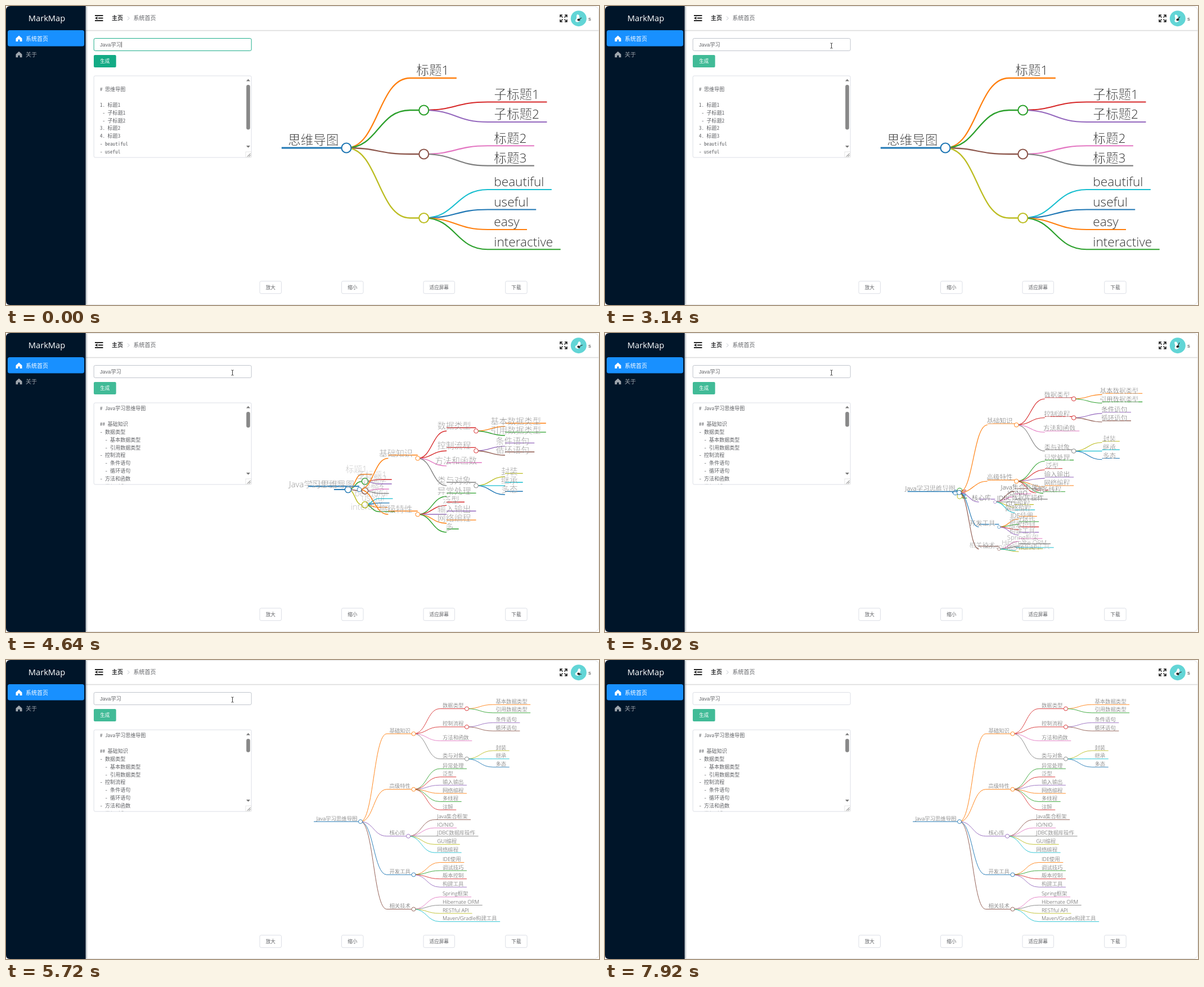
Recreate the animation shown at these times as an HTML page. Size 1054x531 px, loop 8000 ms.

```html
<!DOCTYPE html>
<html lang="zh">
<head>
<meta charset="utf-8">
<title>MarkMap</title>
<style>
html, body { margin: 0; width: 100%; height: 100%; overflow: hidden; background: #fff; }
svg { display: block; width: 1054px; height: 531px; }
text { font-family: 'Liberation Sans', 'Noto Sans CJK SC', 'Noto Sans CJK', sans-serif; white-space: pre; }
.brand { font-family: 'Open Sans', 'Noto Sans', sans-serif; }
.mono { font-family: 'Noto Sans Mono CJK SC', 'Noto Sans CJK SC', 'Noto Sans Mono', monospace; }
.map text { font-family: 'Open Sans', 'Noto Sans CJK SC', 'Noto Sans CJK', sans-serif; font-weight: 300; fill: #333; }
/* a white outline thins the regular weight to a light one */
.map .han { stroke: #fff; stroke-width: 0.03em; }
</style>
</head>
<body>
<svg id="stage" viewBox="0 0 1054 531"></svg>
<script>
const LOOP = 8000;
const stage = document.getElementById('stage');

function set(node, attrs) {
  for (const k in attrs) node.setAttribute(k, attrs[k]);
  return node;
}
function add(tag, attrs, parent = stage, label) {
  const node = set(document.createElementNS('http://www.w3.org/2000/svg', tag), attrs);
  if (label !== undefined) node.textContent = label;
  parent.appendChild(node);
  return node;
}
function label(x, y, size, str, fill, more = {}, parent = stage) {
  return add('text', { x, y: y + size * 0.36, 'font-size': size, fill, ...more }, parent, str);
}
function box(x, y, width, height, rx, fill, stroke = 'none', parent = stage) {
  return add('rect', { x, y, width, height, rx, fill, stroke }, parent);
}
const clamp = v => Math.max(0, Math.min(1, v));
const mix = (a, b, k) => a + (b - a) * k;
// piecewise linear value
function at(t, ts, vs) {
  if (t <= ts[0]) return vs[0];
  for (let i = 1; i < ts.length; i++)
    if (t < ts[i]) return mix(vs[i - 1], vs[i], (t - ts[i - 1]) / (ts[i] - ts[i - 1]));
  return vs[vs.length - 1];
}
function tint(a, b, k) {
  return `rgb(${a.map((v, i) => Math.round(mix(v, b[i], k)))})`;
}

// ---- page frame ----
const MID = { 'text-anchor': 'middle' };
const defs = add('defs', {});
const shade = add('linearGradient', { id: 'shade', x2: 1 }, defs);
add('stop', { offset: 0, 'stop-color': '#001529', 'stop-opacity': 0.3 }, shade);
add('stop', { offset: 1, 'stop-color': '#001529', 'stop-opacity': 0 }, shade);
const clip = add('clipPath', { id: 'clip' }, defs);
box(157, 125, 278, 143.5, 2, '#000', 'none', clip);

box(0.5, 0.5, 1053, 530, 8, 'none', '#e4e4e4');
box(142, 42.8, 911.5, 1.6, 0, '#dcdcdc');
box(141.6, 1, 4, 529, 0, 'url(#shade)');
add('path', { d: 'M141.6 0V531H7Q0 531 0 524V8Q0 0 8 0Z', fill: '#001529' });
label(72.5, 22, 14.7, 'MarkMap', '#fff', { ...MID, class: 'brand' });
box(3, 43, 136, 28.5, 3.5, '#1890ff');
function menu(y, str, fill) {
  add('path', { d: `M23 ${y - 5.5}L28.5 ${y - 0.6}V${y + 5}H24.6V${y + 1.5}H21.4V${y + 5}H17.5V${y - 0.6}Z`, fill });
  label(35, y + 0.3, 10, str, fill);
}
menu(58, '系统首页', '#fff');
menu(86.3, '关于', '#a0a7ae');

add('path', { d: 'M158 17H172.5M164 21.5H172.5M158 26H172.5', stroke: '#222', 'stroke-width': 1.8 });
add('path', { d: 'M158 21.5L162.5 18.8V24.2Z', fill: '#222' });
label(188, 21.8, 10, '主页', '#303133', { 'font-weight': 700 });
add('path', { d: 'M216 18.5L219.3 21.8L216 25.1', fill: 'none', stroke: '#c0c4cc' });
label(226.5, 21.8, 10, '系统首页', '#606266');
for (const [sx, sy] of [[1, 1], [1, -1], [-1, 1], [-1, -1]])
  add('path', { d: 'M6 2V6H2M6 6L1.5 1.5', transform: `translate(991 22) scale(${sx} ${sy})`,
    fill: 'none', stroke: '#222', 'stroke-width': 1.6 });
add('circle', { cx: 1017.8, cy: 22.2, r: 14, fill: '#62d5d6' });
const figure = add('g', {});
add('path', { d: 'M-2 -7Q3 -7 2 -1Q5 3 1 6Q-5 8 -5 3Q-2 0 -3 -4Z', fill: '#fff' }, figure);
add('ellipse', { cx: 1, cy: 2.5, rx: 2.6, ry: 2, fill: '#222' }, figure);
const wing = add('path', { d: 'M1 2L6 -1', stroke: '#333', 'stroke-width': 1.2 }, figure);
label(1035, 22.5, 9.5, 's', '#444');

// ---- form ----
const input = box(156.2, 57.5, 280, 22, 2.5, '#fff', '#dcdfe6');
label(167, 68.6, 9.2, 'Java学习', '#606266');
const caret = box(205, 63.5, 0.8, 10, 0, '#333');
const button = box(156, 87, 39.7, 22, 2, '#13ab85');
label(175.8, 98, 8.6, '生成', '#fff', MID);

box(156.2, 124, 280, 145, 2.5, '#fff', '#dcdfe6');
const editor = add('g', { 'clip-path': 'url(#clip)' });
const rows = Array.from({ length: 11 }, (_, i) =>
  label(167, 134.2 + i * 13.84, 9.05, '', '#606266', { class: 'mono' }, editor));
const bar = add('g', {});
add('path', { d: 'M427 133.5L430.5 129.8L434 133.5ZM427 248L430.5 251.7L434 248Z', fill: '#777' }, bar);
const thumb = box(427.2, 140, 6.6, 79.5, 3.2, '#888', 'none', bar);
box(426, 259, 9.8, 9.6, 0, '#fff', '#e6e6e6');
add('path', { d: 'M429 267.5L434.5 262M432 267.5L434.5 265', stroke: '#444', 'stroke-width': 0.9 });

for (const [x, w, str] of [[451, 38.5, '放大'], [596.5, 38.5, '缩小'], [742, 55.5, '适应屏幕'], [887.7, 38.5, '下载']]) {
  box(x, 488.7, w, 22, 2.5, '#fff', '#dcdfe6');
  label(x + w / 2, 500, 8.6, str, '#606266', MID);
}

const BEFORE = ['', '# 思维导图', '', '1. 标题1', ' - 子标题1', ' - 子标题2', '3. 标题2', '4. 标题3',
  '- beautiful', '- useful', '- easy'];
const AFTER = ['# Java学习思维导图', '', '## 基础知识', '- 数据类型', '  - 基本数据类型', '  - 引用数据类型',
  '- 控制流程', '  - 条件语句', '  - 循环语句', '- 方法和函数', '- 类与对象'];

function drawEditor(t) {
  const fresh = t >= 3850;
  let left = fresh ? Math.floor((t - 3850) * 0.4) : 999;
  (fresh ? AFTER : BEFORE).forEach((line, i) => {
    const shown = line.slice(0, Math.max(0, left));
    if (rows[i].textContent !== shown) rows[i].textContent = shown;
    left -= line.length + 1;
  });
  const lines = fresh ? Math.floor(at(t, [3850, 4220, 4640, 5200, 5450], [0, 21, 39, 43, 46])) : 12.6;
  const height = fresh ? 108 * 145 / (lines * 13.84 + 22) : 79.5;
  set(thumb, { height: Math.min(108, height) });
  bar.style.display = height < 108 ? '' : 'none';
}

// ---- mind maps ----
const COLORS = ['#1f77b4', '#ff7f0e', '#2ca02c', '#d62728', '#9467bd',
  '#8c564b', '#e377c2', '#7f7f7f', '#bcbd22', '#17becf'];
const pen = document.createElement('canvas').getContext('2d');
pen.font = "300 16px 'Open Sans', 'Noto Sans CJK SC', 'Noto Sans CJK', sans-serif";
const measure = str => pen.measureText(str).width + 17.5;

function write(n, str) {
  n.w = measure(str);
  n.text.textContent = '';
  for (const run of str.match(/[\u4e00-\u9fff]+|[^\u4e00-\u9fff]+/g) || [])
    add('tspan', { class: run > '\u4e00' ? 'han' : 'latin' }, n.text, run);
}

// rows: depth, label, colour, line y
function makeMap(table) {
  const root = add('g', { class: 'map' });
  const links = add('g', { fill: 'none' }, root), tops = add('g', {}, root);
  const last = [];
  const nodes = table.map(([depth, str, color, y]) => {
    const n = { depth, str, y, parent: last[depth - 1] };
    last[depth] = n;
    n.path = add('path', { stroke: COLORS[color] }, links);
    n.dot = add('circle', { stroke: COLORS[color], fill: '#fff' }, tops);
    n.text = add('text', {}, tops);
    write(n, str);
    n.dot.style.display = 'none';
    if (n.parent) n.parent.dot.style.display = '';
    return n;
  });
  return { root, nodes };
}
// p: share of the full line width, dot: share of the full circle
function place(n, left, y, s, p, lift, alpha, dot) {
  const w = n.w * s, right = left + w, start = right - w * p;
  n.right = right;
  n.now = y;
  let d = `M${start} ${y - lift}H${right}`;
  if (n.parent) {
    const x = n.parent.right, mid = (x + start) / 2;
    d += `M${x} ${n.parent.now}C${mid} ${n.parent.now} ${mid} ${y} ${start} ${y}`;
  }
  set(n.path, { d, 'stroke-width': s * [2.1, 1.6, 1.5, 1.5][n.depth] });
  set(n.dot, { cx: right, cy: y, r: 6 * s * dot, 'stroke-width': 1.5 * s * dot });
  set(n.text, { x: left + 8 * s, y: y - 4 * s, 'font-size': 16 * s, opacity: alpha });
}

const first = makeMap([
  [0, '思维导图', 0, 252], [1, '标题1', 1, 128],
  [1, '', 2, 185], [2, '子标题1', 3, 170.5], [2, '子标题2', 4, 206],
  [1, '', 5, 263], [2, '标题2', 6, 248.3], [2, '标题3', 7, 283.6],
  [1, '', 8, 376.5], [2, 'beautiful', 9, 326], [2, 'useful', 0, 361.5], [2, 'easy', 1, 397], [2, 'interactive', 2, 432.3]
]);
const second = makeMap([
  [0, 'Java学习思维导图', 0, 287],
  [1, '基础知识', 1, 131],
  [2, '数据类型', 3, 86.5], [3, '基本数据类型', 1, 79.2], [3, '引用数据类型', 2, 93.8],
  [2, '控制流程', 3, 118.8], [3, '条件语句', 4, 111.4], [3, '循环语句', 5, 126],
  [2, '方法和函数', 6, 143.5],
  [2, '类与对象', 7, 175.6], [3, '封装', 8, 161], [3, '继承', 9, 175.6], [3, '多态', 0, 190.2],
  [1, '高级特性', 1, 229.7],
  [2, '异常处理', 2, 193.1], [2, '泛型', 3, 207.7], [2, '输入输出', 4, 222.3],
  [2, '网络编程', 1, 236.9], [2, '多线程', 2, 251.5], [2, '注解', 3, 266.1],
  [1, '核心库', 4, 312.8],
  [2, 'Java集合框架', 5, 283.6], [2, 'IO/NIO', 6, 298.2], [2, 'JDBC数据库操作', 7, 312.8],
  [2, 'GUI编程', 8, 327.4], [2, '网络编程', 9, 342],
  [1, '开发工具', 0, 381.3],
  [2, 'IDE使用', 1, 359.5], [2, '调试技巧', 2, 374.1], [2, '版本控制', 3, 388.7], [2, '构建工具', 4, 403.3],
  [1, '相关技术', 5, 442.5],
  [2, 'Spring框架', 6, 420.8], [2, 'Hibernate ORM', 7, 435.4], [2, 'RESTful API', 8, 450], [2, 'Maven/Gradle构建工具', 9, 464.6]
]);

// growth stages of the second map
const STAGES = [4220, 4640, 5200, 5500];
second.nodes.forEach((n, i) => {
  const { depth, y, parent } = n;
  n.late = depth > 0 && y > 255;
  const early = depth ? 166 + (y - 79) * 1.09 - (depth === 1 && y > 200 ? 8 : 0) : 278;
  n.mid = n.late ? parent.mid : early;
  n.ys = [252, n.mid, at(y, [79, 236.5, 251.5, 266, 283.5, 403, 435.5, 450, 465], [82.5, 242.5, 252, 266, 282.5, 396.5, 427, 440, 437]), y];
  n.ps = [0.02, n.late ? 0 : 0.687, !depth ? 1 : y < 240 ? 0.97 : y < 460 ? 0.9 : 0.76, 1];
  n.born = n.late ? 4640 + (i - 18) * 14 : 4190;
});
const growing = second.nodes.find(n => n.str === '多线程');

function drawFirst(t) {
  const on = t < 5260;
  first.root.style.display = on ? '' : 'none';
  if (!on) return;
  const times = [3830, 4220, 4640, 5200];
  const s = at(t, times, [1.413, 1.363, 0.935, 0.615]);
  const p = at(t, times, [1, 1, 0.33, 0]);
  const x = at(t, times, [605, 606.5, 608, 630]);
  const y = at(t, times, [252, 253, 278, 286]);
  const alpha = at(t, [4220, 4640, 4950], [1, 0.3, 0]);
  const k = s / 1.413 * p;
  for (const n of first.nodes) {
    const w = n.w * s;
    const left = n.depth ? x + [0, 113, 251][n.depth] * k - (1 - p) * w : x - w;
    place(n, left, y + (n.y - 252) * k, s, p, 0, alpha, 1);
  }
}
function drawSecond(t) {
  const on = t >= 4190;
  second.root.style.display = on ? '' : 'none';
  if (!on) return;
  const str = t < 4720 ? '多' : '多线程';
  if (growing.text.textContent !== str) write(growing, str);
  const s = at(t, STAGES, [1.363, 0.935, 0.615, 0.585]);
  const x = at(t, STAGES, [692, 628, 630, 630]);
  for (const n of second.nodes) {
    const p = at(t, STAGES, n.ps), w = n.w * s;
    const left = n.parent ? n.parent.right + p * 80 * s - (1 - p) * w : x - w;
    const alpha = n.late ? 0.9 * clamp((t - n.born) / 320) : at(t, STAGES, [0.008, 0.55, 0.9, 0.9]);
    place(n, left, at(t, STAGES, n.ys), s, p, p * (1 - p) * 29 * s, alpha, p);
    const shown = t >= n.born ? 'visible' : 'hidden';
    n.path.style.visibility = n.dot.style.visibility = n.text.style.visibility = shown;
  }
}

// ---- pointer ----
const pointer = add('g', {});
const beam = add('path', { d: 'M-2 -4.5H-.5M.5 -4.5H2M0 -4.5V4.5M-2 4.5H-.5M.5 4.5H2', stroke: '#222', 'stroke-width': 0.9 }, pointer);
const arrow = add('path', { d: 'M-2 -5V4.5L.3 2.5L1.8 5.8L3.2 5.1L1.8 2H4.6Z', fill: '#fff', stroke: '#222', 'stroke-width': 0.9 }, pointer);
const hand = add('path', { d: 'M-1 0Q0 -1 1 0V4L5 5Q6 5 6 7L5 12H0L-3.5 8Q-4 6 -1 7Z', fill: '#fff', stroke: '#222', 'stroke-width': 0.8 }, pointer);
const MOVES = [1250, 1680, 6240, 6430, 6720, 6800, 7040];

function drawPointer(t) {
  pointer.style.display = t > 770 && t < 7100 ? '' : 'none';
  const x = at(t, MOVES, [178, 402.5, 402.5, 560, 706, 706, 719]);
  const y = at(t, MOVES, [96, 70.5, 70.5, 138, 87, 87, 7]);
  set(pointer, { transform: `translate(${x} ${y})` });
  const inInput = x < 436 && y > 57 && y < 80, inButton = x < 196 && y > 87;
  beam.style.display = inInput ? '' : 'none';
  hand.style.display = inButton ? '' : 'none';
  arrow.style.display = inInput || inButton ? 'none' : '';
}
function drawForm(t) {
  set(button, { fill: tint([19, 171, 133], [65, 187, 151], clamp((t - 920) / 130)) });
  const hover = at(t, [1740, 1950, 6240, 6450], [0, 1, 1, 0]);
  const calm = tint([220, 223, 230], [192, 196, 204], hover).match(/\d+/g).map(Number);
  set(input, { stroke: tint([32, 175, 140], calm, clamp((t - 1150) / 200)) });
  caret.style.display = t < 1150 && t % 1060 < 530 ? '' : 'none';
}
function drawFigure(t) {
  const step = Math.floor(t / 80);
  const turn = 24 * Math.sin(step * 0.9);
  set(figure, { transform: `translate(${1017 + Math.sin(step * 0.9)} 22) rotate(${turn})` });
  set(wing, { d: `M1 2L6 ${-1 + 2.5 * Math.sin(step * 1.7)}` });
}

function frame() {
  const t = performance.now() % LOOP;
  drawFigure(t);
  drawForm(t);
  drawEditor(t);
  drawFirst(t);
  drawSecond(t);
  drawPointer(t);
  requestAnimationFrame(frame);
}
frame();
</script>
</body>
</html>
```
